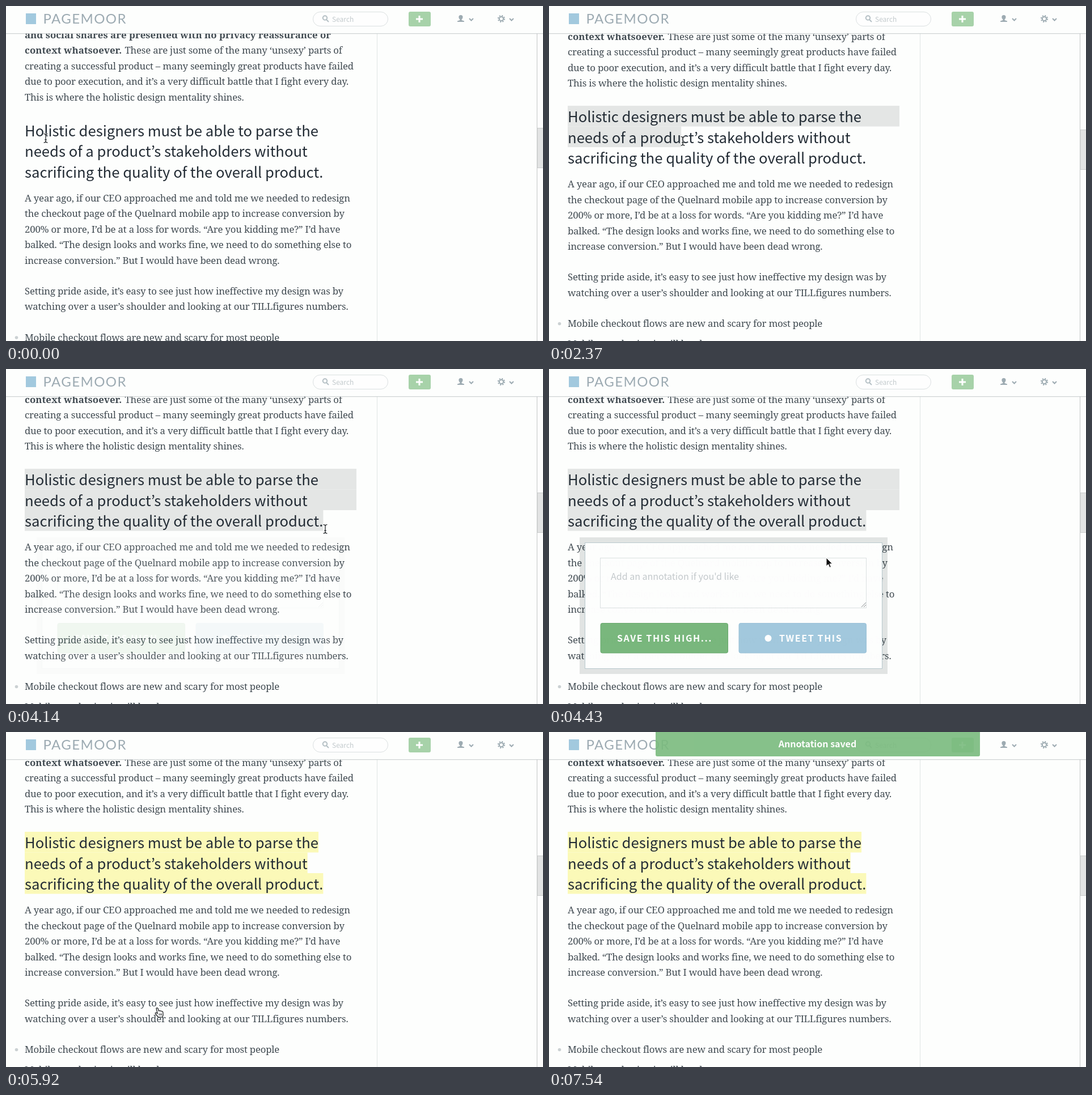
An HTML page that plays this animation: 947 px wide and 591 px high, repeating every 8.5 s.

```html
<!DOCTYPE html>
<html lang="en">
<head>
<meta charset="utf-8">
<title>Saving a highlight</title>
<style>
html, body { margin: 0; width: 100%; height: 100%; overflow: hidden; background: #fdfefd; }
svg { display: block; }
text { font-family: "Noto Sans CJK JP", "Noto Sans CJK SC", "Noto Sans CJK KR", "Noto Sans CJK", "Noto Sans", sans-serif; }
.body text { font: 16.8px "Noto Serif", serif; letter-spacing: -.19px; fill: #404a51; }
.body .strong { font-weight: bold; letter-spacing: .04px; }
#title text { font-size: 25.67px; fill: #222b34; }
.brand { font: 400 24px Lato, sans-serif; letter-spacing: 1.4px; fill: #9caab2; }
.search { font-size: 12px; fill: #c3cacd; }
.hint { font-size: 16px; fill: #c3c9cb; }
.label { font-size: 16px; font-weight: bold; letter-spacing: 1.6px; fill: #fff; }
.notice { font-size: 16px; font-weight: bold; fill: #fff; text-anchor: middle; }
.icon { fill: #9dabb2; }
.line { fill: none; stroke: #9dabb2; stroke-width: 2; }
.pale { stroke: #b4bfc4; }
</style>
</head>
<body>
<svg width="947" height="591" viewBox="0 0 947 591">
  <rect width="947" height="591" fill="#fdfefd"/>
  <g id="page">
    <g id="marks"></g>
    <g id="title"></g>
    <g id="copy" class="body"></g>
    <circle cx="18.5" cy="560.5" r="2.8" fill="#cbd1d3"/>
  </g>

  <path d="M654.5 49V591" stroke="#e0e4e4"/>
  <path d="M936.5 49V591" stroke="#c3c6c7"/>
  <rect x="937" y="49" width="10" height="542" fill="#fdfdfd"/>
  <rect id="thumb" x="937" width="11" height="70" y="218.5" fill="#e2e3e3" stroke="#c9cbcb"/>

  <g id="nav">
    <rect width="947" height="48" fill="#fdfefd"/>
    <rect y="48" width="947" height="1" fill="#cfd4d5"/>
    <rect y="49" width="947" height="1" fill="#000" opacity=".04"/>
    <rect x="35" y="13" width="18" height="19" fill="#a2c9de"/>
    <text class="brand" x="65.5" y="31">PAGEMOOR</text>
    <rect x="541.5" y="10.5" width="132" height="25" rx="12.5" fill="#fefefe" stroke="#dbe0e1"/>
    <circle class="line pale" cx="562.5" cy="21" r="3.7"/>
    <path class="line pale" d="M565 24L569 28"/>
    <text class="search" x="575" y="27.5">Search</text>
    <rect x="710" y="10" width="39" height="26" rx="3" fill="#a7d2a9"/>
    <path d="M729 17V29M723 23H735" stroke="#fff" stroke-width="3"/>
    <path class="icon" d="M802 16c5 0 4 6 1.6 7.5v1.5l4.4 1.5v1.5h-12v-1.5l4.4-1.5v-1.5C798 22 797 16 802 16z"/>
    <circle class="line" cx="873.5" cy="22.5" r="3.6"/>
    <circle class="line" cx="873.5" cy="22.5" r="5.6" stroke-dasharray="2.2 2.198"/>
    <path class="line" d="M817 22l3.5 3.5L824 22M888 22l3.5 3.5L895 22"/>
  </g>

  <g id="popup">
    <path d="M54 297H597V538H54zM64 307V528H587V307z" fill="#1c2c28" opacity=".125"/>
    <rect x="63.5" y="306.5" width="524" height="222" fill="#fefefe" stroke="#b9c9cd"/>
    <rect x="90.5" y="333.5" width="469" height="88" fill="#fefefe" stroke="#dbe0e1"/>
    <path d="M551 420l8-8M555 420l4-4" stroke="#858b8d"/>
    <text class="hint" x="109" y="372">Add an annotation if you'd like</text>
    <rect x="91" y="448.5" width="224.5" height="52.5" rx="3" fill="#78b77c" stroke="#67a86c"/>
    <path id="press" d="M92 449.5H315" stroke="#4f9156" stroke-width="2" opacity=".5"/>
    <text class="label" x="120" y="481">SAVE THIS HIGH...</text>
    <rect x="335" y="448.5" width="224.5" height="52.5" rx="3" fill="#a2c8dd" stroke="#9ac1d7"/>
    <circle cx="386.5" cy="475" r="6" fill="#fff"/>
    <text class="label" x="406" y="481">TWEET THIS</text>
  </g>

  <g id="toast">
    <rect x="188" y="-5" width="572" height="48" rx="3" fill="#7abb7e"/>
    <text class="notice" x="473.5" y="27">Annotation saved</text>
  </g>

  <defs>
    <path id="beamShape" d="M-3.5-7.5Q-.5-7.5 0-5.5Q.5-7.5 3.5-7.5M0-5.5V6M-3.5 8Q-.5 8 0 6Q.5 8 3.5 8M-2 3H2"/>
  </defs>
  <g id="cursors" stroke-linejoin="round">
    <g id="beam" fill="none">
      <use href="#beamShape" stroke="#fff" stroke-width="2.8" opacity=".7"/>
      <use href="#beamShape" stroke="#15191c" stroke-width="1.2"/>
    </g>
    <path id="arrow" d="M0 0V15L3.5 11.7L6 17.3L8.4 16.2L6 10.8H10.8z" fill="#111" stroke="#fff"/>
    <g id="hand" fill="#fff" stroke="#16191b" stroke-width="1.2">
      <path d="M-2 .5Q-.5-1.5 1 .7L2.4 5.2Q3.7 3.8 5 5.3Q6.5 4.3 7.5 6Q9.4 5.3 9.8 7.5L10.2 12L8.8 16H1.5L-3.2 10.5Q-4.8 8.3-2.5 8L.2 9.8z"/>
      <path d="M3.2 9.5V13M5.4 9.5V13M7.5 9.5V13" stroke-width=".9"/>
    </g>
  </g>
</svg>
<script>
const LOOP = 8500, LEFT = 33, TOP = 176, LEAD = 36.5, RIGHT = 618;
const $ = id => document.getElementById(id);

function add(parent, tag, attrs, content = '') {
  const el = document.createElementNS('http://www.w3.org/2000/svg', tag);
  for (const key in attrs) el.setAttribute(key, attrs[key]);
  el.textContent = content;
  parent.appendChild(el);
  return el;
}

const titleLines = [
  'Holistic designers must be able to parse the',
  'needs of a product’s stakeholders without',
  'sacrificing the quality of the overall product.'
].map((s, i) => add($('title'), 'text', { x: LEFT, y: 205 + i * LEAD }, s));
const marks = titleLines.map((_, i) =>
  add($('marks'), 'rect', { x: LEFT, y: TOP + i * LEAD, height: LEAD, width: 0 }));

function paragraph(y, lines) {
  lines.forEach((s, i) => add($('copy'), 'text', { x: LEFT, y: y + i * 27.5 }, s));
}
const strong = (y, s) => add($('copy'), 'text', { x: LEFT, y, class: 'strong' }, s);

strong(32, 'and social shares are presented with no privacy reassurance or');
strong(59.5, 'context whatsoever.');
add($('copy'), 'text', { x: 209.5, y: 59.5 }, 'These are just some of the many ‘unsexy’ parts of');
paragraph(87, [
  'creating a successful product – many seemingly great products have failed',
  'due to poor execution, and it’s a very difficult battle that I fight every day.',
  'This is where the holistic design mentality shines.'
]);
paragraph(320, [
  'A year ago, if our CEO approached me and told me we needed to redesign',
  'the checkout page of the Quelnard mobile app to increase conversion by',
  '200% or more, I’d be at a loss for words. “Are you kidding me?” I’d have',
  'balked. “The design looks and works fine, we need to do something else to',
  'increase conversion.” But I would have been dead wrong.'
]);
paragraph(484, [
  'Setting pride aside, it’s easy to see just how ineffective my design was by',
  'watching over a user’s shoulder and looking at our TILLfigures numbers.'
]);
paragraph(566, ['Mobile checkout flows are new and scary for most people']);
paragraph(601.5, ['Mobile purchasing is still hard to trust yet']);

const clamp = u => Math.max(0, Math.min(1, u));
const swing = u => .5 - Math.cos(clamp(u) * Math.PI) / 2;
const mix = (a, b, u) => a + (b - a) * u;
const move = (x0, y0, x1, y1, u, v = u) => ({ x: mix(x0, x1, u), y: mix(y0, y1, v) });

// Number of the n evenly spaced changes from a to b that have happened by t.
const count = (t, a, b, n) =>
  t < a ? 0 : Math.min(n, 1 + Math.floor((t - a) / (b - a) * (n - 1) + .06));

function overPopup({ x, y }) {
  if (y < 300) return 'beam';
  if (y > 448 && x > 91 && x < 560) return 'hand';
  return x > 91 && x < 560 && y > 334 && y < 421 ? 'beam' : 'arrow';
}

function pointer(t) {
  if (t < 1780)
    return { kind: 'beam', ...move(70, 233, 33, 193, swing(count(t, 440, 1480, 8) / 8)) };
  if (t < 2970)
    return { kind: 'beam', ...move(33, 193, 390, 272, (count(t, 1780, 2820, 8) / 8) ** 1.2) };
  if (t < 4140) {
    const u = 1 - (1 - count(t, 2970, 3990, 8) / 8) ** 2.2;
    return { kind: 'beam', ...move(390, 272, 563, 282, u) };
  }
  if (t < 5630) {
    const p = move(563, 282, 267, 487, swing((count(t, 4140, 5030, 7) - 1) / 6));
    return { kind: overPopup(p), ...p };
  }
  if (t < 6810) {
    const u = clamp((count(t, 5630, 6660, 8) - 3) / 5) ** 1.5;
    return { kind: u ? 'beam' : 'hand', ...move(267, 487, 542, 476, u) };
  }
  const n = count(t, 6810, 7540, 6);
  if (n > 5) return { kind: 'none', x: 0, y: 0 };
  const p = move(542, 476, 930, 578, n / 5, (n / 5) ** 1.3);
  return { kind: p.x < 655 ? 'beam' : 'arrow', ...p };
}

// Nearest character edge to x on a title line.
function snap(line, x) {
  let best = LEFT;
  for (let i = 0; i < line.getNumberOfChars(); i++) {
    const edge = line.getEndPositionOfChar(i).x;
    if (Math.abs(edge - x) < Math.abs(best - x)) best = edge;
  }
  return best;
}

function drawMarks(t, p) {
  const saved = t >= 5630;
  const end = t < 4140 ? p : { x: 563, y: 282 };
  const row = Math.min(2, Math.floor((end.y - TOP) / LEAD));
  marks.forEach((mark, i) => {
    let width = 0;
    if (saved) width = titleLines[i].getComputedTextLength();
    else if (t >= 1780 && i < row) width = RIGHT - LEFT;
    else if (t >= 1780 && i === row) width = snap(titleLines[i], end.x) - LEFT;
    mark.setAttribute('width', width);
    mark.setAttribute('fill', saved ? '#fbf9b8' : '#e4e6e5');
  });
}

// Fade progress at the n-th change since the fade began.
const fade = (n, length) => n > 0 ? swing((80 + (n - 1) * 148) / length) : 0;

function popupOpacity(t) {
  return t < 5630
    ? fade(count(t, 4140, 5030, 7), 400)
    : 1 - fade(count(t, 5630, 6660, 8), 370);
}

const toastOpacity = t => .9 * fade(count(t, 5630, 6660, 8) - 3, 400);

function draw(t) {
  const p = pointer(t), start = t < 140;
  $('page').setAttribute('transform', `translate(0 ${start ? 24.5 : 0})`);
  $('thumb').setAttribute('y', start ? 215.5 : 218.5);
  drawMarks(t, p);
  $('popup').setAttribute('opacity', popupOpacity(t));
  $('press').setAttribute('visibility', t >= 5330 ? 'inherit' : 'hidden');
  $('toast').setAttribute('opacity', toastOpacity(t));
  $('cursors').setAttribute('transform', `translate(${Math.round(p.x)} ${Math.round(p.y)})`);
  for (const kind of ['beam', 'arrow', 'hand'])
    $(kind).setAttribute('visibility', kind === p.kind ? 'visible' : 'hidden');
}

const begin = performance.now();
function tick() {
  draw((performance.now() - begin) % LOOP);
  requestAnimationFrame(tick);
}
tick();
</script>
</body>
</html>
```
